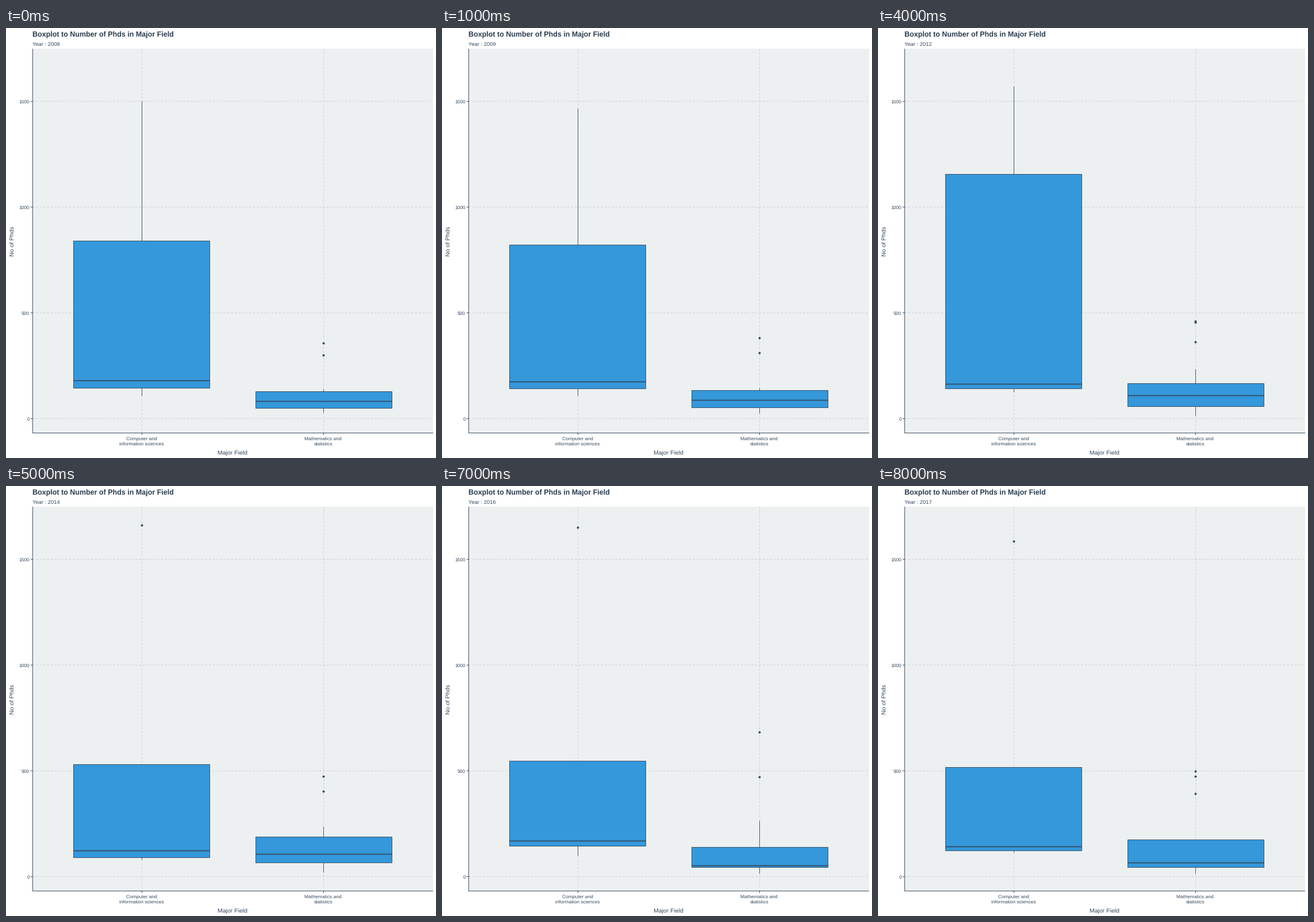
These frames come from a looping animation (748 px wide and 748 px high, 9000 ms). A matplotlib script:

```python
import math

import numpy as np
import matplotlib.pyplot as plt
from matplotlib.animation import FuncAnimation
from matplotlib.patches import Rectangle

SIZE, DPI = 748, 64
PX = 72 / DPI  # points per pixel
INK, TEXT, GRID, PANEL, FILL = "#2c3e50", "#34495e", "#bdc3c7", "#ecf0f1", "#3498db"
LEFT, RIGHT, TOP, BOTTOM = 46, 743, 36, 705
STEP = (RIGHT - LEFT) / 2.2  # two categories with 0.6 padding on each side
YEARS = [year for year in range(2008, 2018) if year != 2013]

# Computing: observations in key years; the box is worked out from them.
COMPUTING = {
    2008: (107, 181, 1500),
    2011: (110, 166, 1393),
    2012: (125, 136, 163, 167, 1484, 1570),
    2014: (79, 94, 152, 1663),
    2016: (100, 161, 177, 1651),
    2017: (116, 124, 162, 1586),
}
# Mathematics: low, quartiles, high, then outliers in key years.
MATHS = {
    2008: (27, 50, 82, 128, 139, 302, 360),
    2011: (19, 62, 98, 147, 153, 332, 433),
    2012: (16, 57, 111, 167, 234, 365, 457, 463),
    2014: (20, 65, 108, 189, 236, 406, 475),
    2016: (16, 45, 53, 139, 265, 473, 686),
    2017: (16, 44, 67, 176, 176, 394, 477, 502),
}

plt.rcParams["font.family"] = "Liberation Sans"
plt.rcParams["text.hinting"] = "none"
plt.rcParams["path.snap"] = False

fig = plt.figure(figsize=(SIZE / DPI, SIZE / DPI), dpi=DPI, facecolor="white")
ax = fig.add_axes([0, 0, 1, 1])
ax.set(xlim=(0, SIZE), ylim=(SIZE, 0))
ax.axis("off")


def mid(p):
    """Centre of the pixel that holds p."""
    return math.floor(p) + 0.5


def y_px(value):
    return mid(679.9 - 0.3683 * value)


def between_keys(keys, year):
    """Values of a key year, or a blend of the key years around it."""
    before = max(k for k in keys if k <= year)
    after = min(k for k in keys if k >= year)
    t = (year - before) / max(after - before, 1)
    if t == 0:
        return np.array(keys[before], float)
    return (1 - t) * np.array(keys[before]) + t * np.array(keys[after])


def summary(sample):
    """Low, quartiles, high and outliers by the 1.5 IQR rule."""
    q1, med, q3 = np.percentile(sample, [25, 50, 75])
    inside = sample <= q3 + 1.5 * (q3 - q1)
    return [sample.min(), q1, med, q3, sample[inside].max(), *sample[~inside]]


def line(xs, ys, color=INK, width=0.9, z=3, **kw):
    return ax.plot(xs, ys, color=color, lw=width * PX, zorder=z,
                   solid_capstyle="butt", dash_capstyle="butt", **kw)[0]


def grid_line(xs, ys):
    line(xs, ys, GRID, width=0.8, z=2, ls=(0, (4, 4)))


def label(x, y, text, size, color=TEXT, **kw):
    return ax.text(x, y, text, fontsize=size * PX, color=color,
                   va="baseline", rotation_mode="anchor", **kw)


class Box:
    def __init__(self, center):
        self.x = mid(center)
        left, right = (mid(center + s * 0.375 * STEP) for s in (-1, 1))
        self.lower, self.upper = (line([self.x] * 2, [0, 0], TEXT, z=4) for _ in range(2))
        self.rect = ax.add_patch(Rectangle((left, 0), right - left, 1, fc=FILL,
                                           ec=TEXT, lw=0.9 * PX, zorder=5))
        self.median = line([left, right], [0, 0], TEXT, width=1.7, z=6)
        self.dots = line([], [], TEXT, z=6, ls="", marker="o", ms=3.9 * PX, mew=0)

    def update(self, stats):
        low, q1, med, q3, high, *outliers = map(y_px, stats)
        self.lower.set_ydata([q1, low])
        self.upper.set_ydata([q3, high])
        self.rect.set_y(q3)
        self.rect.set_height(q1 - q3)
        self.median.set_ydata([med, med])
        self.dots.set_data([self.x] * len(outliers), outliers)


ax.add_patch(Rectangle((LEFT, TOP), RIGHT - LEFT, BOTTOM - TOP, fc=PANEL, lw=0))

for value in range(0, 1501, 500):
    y = y_px(value)
    grid_line([LEFT, RIGHT], [y, y])
    line([LEFT - 3, LEFT], [y, y])
    label(41, y + 3.5, str(value), 8.4, ha="right")

boxes = []
names = ("Computer and\ninformation sciences", "Mathematics and\nstatistics")
for i, name in enumerate(names):
    center = LEFT + (0.6 + i) * STEP
    x = mid(center)
    grid_line([x, x], [BOTTOM, TOP])
    line([x, x], [BOTTOM, BOTTOM + 3])
    for j, row in enumerate(name.split("\n")):
        label(x - 0.9, 717.3 + 9 * j, row, 8.45, ha="center")
    boxes.append(Box(center))

line([mid(LEFT)] * 2, [TOP, BOTTOM])
line([LEFT, RIGHT], [mid(BOTTOM - 1)] * 2)

label(46, 15, "Boxplot to Number of Phds in Major Field", 12.5, INK, weight="bold")
subtitle = label(46, 31, "", 9.35)
label(394.3, 742, "Major Field", 10.45, ha="center")
label(14, 371, "No of Phds", 10.45, ha="center", rotation=90)


def draw(i):
    year = YEARS[i]
    subtitle.set_text(f"Year : {year}")
    boxes[0].update(summary(between_keys(COMPUTING, year)))
    boxes[1].update(between_keys(MATHS, year))
    return []


anim = FuncAnimation(fig, draw, frames=len(YEARS), interval=1000,
                     repeat=True, repeat_delay=0, blit=False)
plt.show()
```
